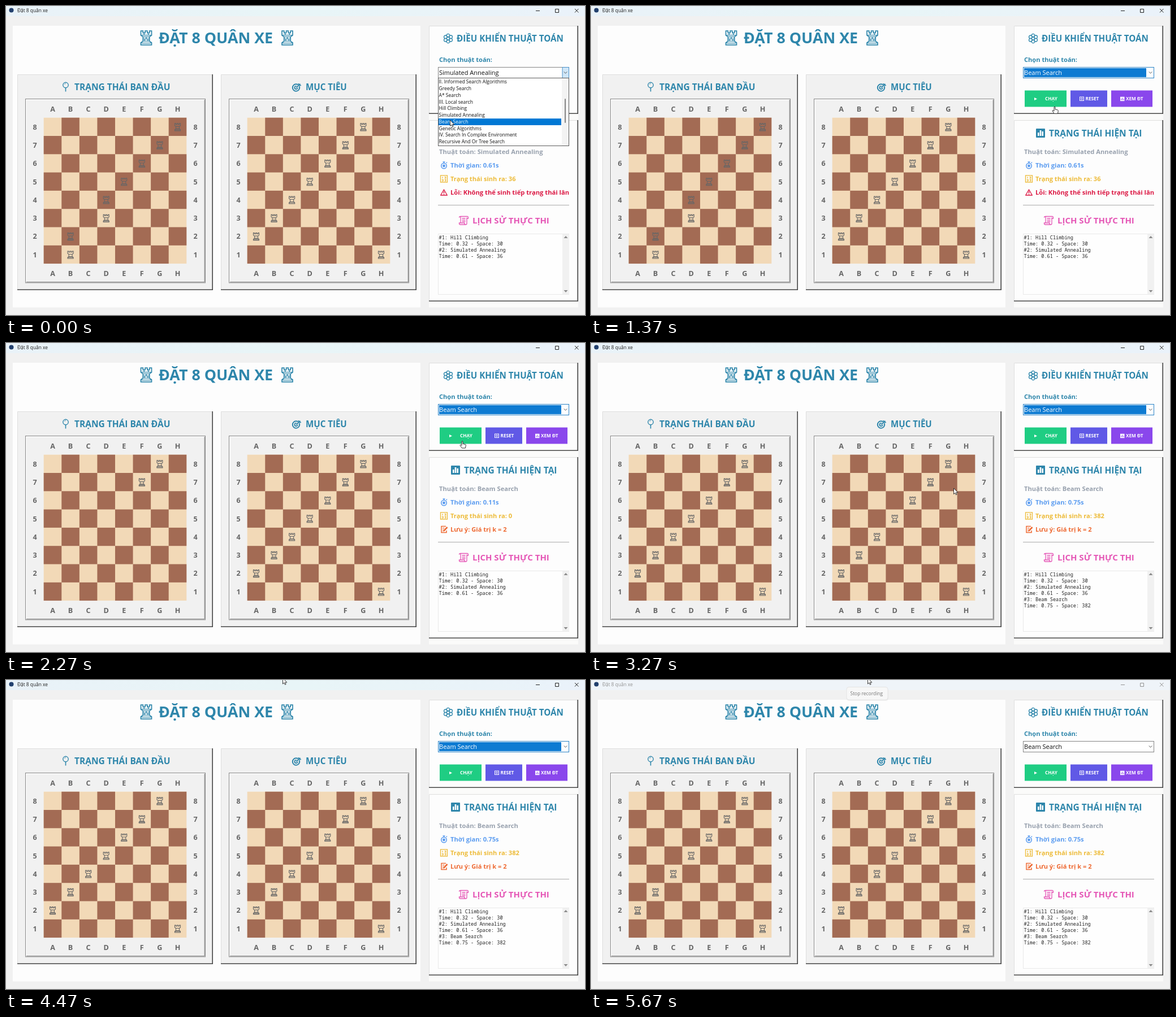
These frames come from a looping animation (1024 px wide and 547 px high, 5710 ms). An HTML page:

```html
<!DOCTYPE html>
<html lang="vi">
<head>
<meta charset="utf-8">
<title>Đặt 8 quân xe</title>
<style>
html, body { margin: 0; width: 100%; height: 100%; overflow: hidden; background: #f1f1f1; }
svg { display: block; width: 100%; height: 100%; }
text { font-family: "Open Sans", "Noto Sans", sans-serif; white-space: pre; }
.b { font-weight: 700; }
.m { font-family: "Noto Sans Mono", "DejaVu Sans Mono", monospace; }
</style>
</head>
<body>
<svg id="stage" viewBox="0 0 1024 547" preserveAspectRatio="none"></svg>
<script>
const LOOP = 5710;
const BLUE = '#2e86ab', PINK = '#e557b6', GRAY = '#98a1ae', SKY = '#5b9cf0',
      GOLD = '#edbb38', RED = '#dc1a45', ORANGE = '#ee6a33', INK = '#666';

const rect = (x, y, w, h, fill, extra = '') =>
  `<rect x="${x}" y="${y}" width="${w}" height="${h}" fill="${fill}" ${extra}/>`;
const line = (d, stroke, w = 1, extra = '') =>
  `<path d="${d}" fill="none" stroke="${stroke}" stroke-width="${w}" ${extra}/>`;
const text = (x, y, size, fill, s, cls = '', extra = '') =>
  `<text x="${x}" y="${y}" font-size="${size}" fill="${fill}" class="${cls}" ${extra}>${s}</text>`;
const bold = (x, y, size, fill, s, extra) => text(x, y, size, fill, s, 'b', extra);
const group = (id, body, extra = '') => `<g id="${id}" ${extra}>${body}</g>`;
const at = (x, y, body, k = 1) => `<g transform="translate(${x} ${y}) scale(${k})">${body}</g>`;

// Raised panel with a dark right and bottom edge
const panel = (x, y, w, h, fill) => rect(x, y, w, h, fill) +
  line(`M${x + .5} ${y + h}V${y + .5}H${x + w}`, '#dedede') +
  line(`M${x} ${y + h - .8}H${x + w - .8}V${y}`, '#454545', 1.6);

const ROOK = 'M-5-6.5h2v1.8h2v-1.8h2v1.8h2v-1.8h2v4l-2 1.5v4l2 1.5v2h-10v-2l2-1.5v-4l-2-1.5z';
const rook = (x, y) => at(x, y, line(ROOK + 'M-3-1h6M-3 3h6M-5 4.7h10', INK, 1.1));
const bigRook = x => at(x, 56.5, line(ROOK, BLUE, .9) +
  line('M-4.5-2.6h9M-3-1h6M-3 1h6M-3 3h6M-4.6 4.8h9.2M0-1v2M-1.5 1v2M1.5 1v2M-2-4.4v1.8M2-4.4v1.8', BLUE, .7), 1.9);

const CW = 31.57, CH = 32.3, LEFT = 66.7, TOP = 197.7;
const piece = (dx, col, row) => rook(LEFT + dx + (col + .5) * CW, TOP + (row + .5) * CH + .5);
const GOAL = [6, 5, 4, 3, 2, 1, 0, 7];
const START = [7, 6, 5, 4, 3, 3, 1, 1];

function board(dx) {
  let s = panel(20 + dx, 121, 346, 382, '#f1f1f1');
  s += rect(34.5 + dx, 164.5, 318, 325.5, 'none', 'stroke="#8c8c8c"');
  s += line(`M${36 + dx} 488.5V166H${351 + dx}`, '#fff') +
       line(`M${36 + dx} 488.7H${351.2 + dx}V166`, '#777');
  s += rect(LEFT + dx, TOP, CW * 8, CH * 8, '#f2d9b7');
  for (let r = 0; r < 8; r++) {
    for (let c = 0; c < 8; c++)
      if ((r + c) % 2) s += rect(LEFT + dx + c * CW, TOP + r * CH, CW, CH, '#a36b54');
    const x = LEFT + dx + (r + .5) * CW, y = TOP + (r + .5) * CH + 4.8, mid = 'text-anchor="middle"';
    for (const ly of [186.5, 477.5]) s += bold(x, ly, 12.6, INK, 'ABCDEFGH'[r], mid);
    for (const lx of [51, 335]) s += bold(lx + dx, y, 12.6, INK, 8 - r, mid);
  }
  return s;
}

const petals = [0, 1, 2, 3, 4, 5].map(i => {
  const a = i * Math.PI / 3;
  return `<circle cx="${(5.4 * Math.sin(a)).toFixed(2)}" cy="${(-5.4 * Math.cos(a)).toFixed(2)}" r="2.8"/>`;
}).join('');
const icon = {
  gear: at(782, 57.5, `<g fill="none" stroke="${BLUE}" stroke-width="1.3">${petals}<circle r="2.6"/></g>`),
  pin: at(105.5, 143, `<circle cy="-3" r="4.7" fill="none" stroke="${BLUE}" stroke-width="1.4"/>` +
    line('M0 1.8V8.5', BLUE, 1.6) + line('M-2-4.2q.6-1.6 2.2-1.6', BLUE, 1)),
  target: at(513, 144.5, `<g fill="none" stroke="${BLUE}"><circle r="6.2" stroke-width="2"/><circle r="2.6" stroke-width="1.8"/></g>` +
    line('M0 0L7-6', '#f1f1f1', 3.6) + line('M0 0L7.5-6.5M4.5-4V-7.5M4.5-4H9', BLUE, 1.7)),
  chart: at(795, 225, rect(-8, -8, 16, 16, BLUE, 'rx="1"') +
    rect(-5, -1, 2.6, 6, '#fff') + rect(-1.3, -5, 2.6, 10, '#fff') + rect(2.4, -3, 2.6, 8, '#fff')),
  watch: at(774.5, 282, `<circle cy="1" r="4.7" fill="none" stroke="${SKY}" stroke-width="1.6"/><circle cy="1" r="2.4" fill="${SKY}"/>` +
    line('M-2-6H2M0-6V-3M4-4l1.5-1.5', SKY, 1.4)),
  digits: at(774.5, 306, rect(-6, -6, 12, 12, 'none', `stroke="${GOLD}" stroke-width="1.3"`) +
    line('M-2.5-3.8v3M1-3.4h2.2v2.4H1M-3.8 1.4h2.4v2.4h-2.4M1.2 1.2h2v2.6h-2', GOLD, 1.2)),
  warn: at(774.5, 330, line('M0-5L5.8 5H-5.8Z', RED, 1.4, 'stroke-linejoin="round"') + line('M0-2V1.8M0 2.7V4', RED, 1.4)),
  note: at(774.5, 330, line('M3.5-5.5H-4.5V5.5H4.5V2', ORANGE, 1.5) +
    line('M-2.5-2.5H1M-2.5 0H0M-2.5 2.7H1', ORANGE, 1.2) + line('M0 2.4L6-4', ORANGE, 2.6)),
  scroll: at(809.5, 379.5, line('M-5.5 4V-7H6.5q1.5 0 1.5 2v1.5H5.5M5.5-5V5.5q0 2-2 2H-6q-2 0-2-2V4.5H1.5v1.2q0 1.8 2 1.8M-8-5q0-2 2.2-2M-3-3.5H3M-3-.7H3M-3 2H3', PINK, 1.3))
};

function button(x, w, fill, label, lx) {
  return rect(x, 149.5, w, 29, fill) + bold(lx, 167.2, 8.2, '#fff', label);
}

const ITEMS = ['II. Informed Search Algorithms', 'Greedy Search', 'A* Search', 'III. Local search',
  'Hill Climbing', 'Simulated Annealing', 'Beam Search', 'Genetic Algorithms',
  'IV. Search In Complex Environment', 'Recursive And Or Tree Search'];
const dropdown = rect(764.5, 127.5, 231, 120, '#fff', 'stroke="#5c5c5c"') +
  rect(983, 128, 12, 119, '#f3f3f3') + rect(988, 164, 2, 43, '#858585', 'rx="1"') +
  ITEMS.map((s, i) => {
    const on = i === 6;
    return (on ? rect(765, 199.2, 217, 11.8, '#0078d4') : '') +
      text(765.5, (137.2 + i * 11.77).toFixed(1), 8.5, on ? '#fff' : '#111', s);
  }).join('');

const HISTORY = ['#1: Hill Climbing', 'Time: 0.32 - Space: 30', '#2: Simulated Annealing',
  'Time: 0.61 - Space: 36', '#3: Beam Search', 'Time: 0.75 - Space: 382'];
const log = (from, to) => HISTORY.slice(from, to)
  .map((s, i) => text(765.5, 412.5 + (from + i) * 11, 8.57, '#222', s, 'm')).join('');

const chevron = line('M986.7 116.4l2.8 2.8 2.8-2.8', '#555');

document.getElementById('stage').innerHTML =
  `<defs><linearGradient id="sky"><stop offset="0" stop-color="#e9f2f8"/><stop offset=".5" stop-color="#e8f5f7"/><stop offset="1" stop-color="#eaf2fa"/></linearGradient>
  <clipPath id="card"><rect x="748" y="203" width="249" height="320"/></clipPath></defs>` +
  rect(0, 0, 1024, 547, '#f1f1f1') +
  rect(0, 0, 1024, 18, 'url(#sky)') +
  rect(0, 0, 1024, 18, '#eff4f9', 'id="dim"') +
  '<circle cx="9.5" cy="7.5" r="4" fill="#22406e"/>' +
  group('bar', text(20, 11.2, 8.4, 'currentColor', 'Đặt 8 quân xe') +
    line('M937 8.5h7M971.5 5.5h6v6h-6zM1006 5l6.5 6.5M1012.5 5l-6.5 6.5', 'currentColor')) +

  rect(12, 35, 721, 498.5, '#fdfdfd') +
  bigRook(248) + bigRook(497.5) +
  bold(270, 65.6, 26.8, BLUE, 'ĐẶT 8 QUÂN XE') +
  board(0) + board(360) +
  icon.pin + bold(121, 149, 15.5, BLUE, 'TRẠNG THÁI BAN ĐẦU') +
  icon.target + bold(530, 149, 15.1, BLUE, 'MỤC TIÊU') +
  GOAL.map((c, r) => piece(360, c, r)).join('') +
  group('old', START.map((c, r) => piece(0, c, r)).join('')) +
  group('fresh', GOAL.map((c, r) => `<g>${piece(0, c, r)}</g>`).join('')) +

  rect(748, 35, 264, 498.5, '#fbfbfa') +
  panel(748, 35, 264, 156, '#fdfdfd') +
  panel(748, 202, 264, 321, '#fdfdfd') +
  icon.gear + bold(797, 63, 15.2, BLUE, 'ĐIỀU KHIỂN THUẬT TOÁN') +
  bold(766, 99, 11.1, BLUE, 'Chọn thuật toán:') +
  rect(764.5, 108.5, 231, 19, '#fff', 'id="combo"') +
  rect(766, 110, 216, 16, '#0e7bd2', 'id="picked"') +
  rect(984, 108.5, 11.5, 19, '#cfe6f8', 'id="arrow" stroke="#4a90c8"') + chevron +
  text(766, 122.3, 11, '#111', '', '', 'id="choice"') +
  button(767, 74, '#1fcd83', 'CHẠY', 803) +
  '<path d="M784 162v5l5-2.5z" fill="#fff"/>' +
  button(848, 65, '#6059e6', 'RESET', 874.5) +
  rect(864.5, 161, 7, 6.5, 'none', 'stroke="#fff"') + '<circle cx="868" cy="164.3" r="1.5" fill="none" stroke="#fff"/>' +
  button(920, 73, '#8a47ec', 'XEM ĐT', 946) +
  rect(936, 160.7, 7.5, 7.5, '#fff') + line('M938 166.5v-2.5M940 166.5v-4M942 166.5v-2', '#8a47ec') +

  icon.chart + bold(810, 230.8, 15.5, BLUE, 'TRẠNG THÁI HIỆN TẠI') +
  bold(766, 261.6, 11.2, GRAY, '', 'id="algo"') +
  icon.watch + bold(786, 285.8, 11.2, SKY, '', 'id="time"') +
  icon.digits + bold(786, 309.8, 11.1, GOLD, '', 'id="count"') +
  group('error', icon.warn + bold(786, 334, 11.2, RED, 'Lỗi: Không thể sinh tiếp trạng thái lân'), 'clip-path="url(#card)"') +
  group('hint', icon.note + bold(786, 334, 11.1, ORANGE, 'Lưu ý: Giá trị k = 2')) +
  line('M764 352.5H996', '#aaa') +
  icon.scroll + bold(825, 385, 15, PINK, 'LỊCH SỬ THỰC THI') +
  rect(764.5, 403.5, 231, 107, '#fefefe', 'stroke="#e9e9e9"') +
  rect(984, 404, 12, 106, '#f1f1f1') +
  '<path d="M986.5 411l3.5-4 3.5 4zM986.5 503l3.5 4 3.5-4z" fill="#8b8b8b"/>' +
  log(0, 4) + group('third', log(4, 6)) +
  group('list', dropdown) +

  group('tip', rect(452.5, 14, 73, 23, '#000', 'rx="4" opacity=".05"') +
    rect(452, 12.5, 73, 22.5, '#f7f7f7', 'rx="4" stroke="#e4e4e4"') +
    text(458.5, 26.8, 8.45, '#777', 'Stop recording')) +
  group('cursor',
    '<path id="pointer" d="M0 0V10.5L2.4 8.3 4 11.8 5.6 11 4.1 7.7H7.3Z" fill="#fff" stroke="#222" stroke-width=".9"/>' +
    '<path id="hand" d="M-1 .8Q0-.4 1 .8V5l4.3 1q1.2.4 1 1.8L5.4 12.5H-.6L-3.8 8Q-4.2 6.5-2.6 6.8L-1 8Z" fill="#fff" stroke="#222" stroke-width=".9"/>');

const el = {};
document.querySelectorAll('svg [id]').forEach(e => el[e.id] = e);
const show = (e, on) => { e.style.display = on ? '' : 'none'; };
const put = (e, s) => { if (e.textContent !== s) e.textContent = s; };

const PICK = 130, RUN = 2140, STEP = 107, DONE = RUN + 7 * STEP, TIP = 5380, BLUR = 5470;
// Cursor stops: time, x, y
const PATH = [[0, 785.5, 202], [200, 785.5, 202], [720, 508.5, 8], [900, 508.5, 8], [1340, 820, 178],
  [1500, 820, 178], [1800, 807, 173.5], [2900, 807, 173.5], [3250, 641.5, 257],
  [3300, 641.5, 257], [3850, 489.5, -3.5], [LOOP, 489.5, -3.5]];

function cursorAt(t) {
  let i = 1;
  while (i < PATH.length - 1 && PATH[i][0] < t) i++;
  const [t0, x0, y0] = PATH[i - 1], [t1, x1, y1] = PATH[i];
  const u = Math.min(1, (t - t0) / (t1 - t0)), k = u * u * (3 - 2 * u);
  return [x0 + (x1 - x0) * k, y0 + (y1 - y0) * k];
}

function draw(t) {
  const open = t < PICK, ran = t >= RUN, done = t >= DONE, blur = t >= BLUR;
  const level = Math.min(7, Math.floor((t - RUN) / STEP));

  show(el.list, open);
  show(el.arrow, open);
  show(el.picked, !open && !blur);
  el.combo.setAttribute('stroke', open || blur ? '#858585' : '#2b83c6');
  el.choice.setAttribute('fill', open || blur ? '#111' : '#fff');
  put(el.choice, open ? 'Simulated Annealing' : 'Beam Search');

  show(el.old, !ran);
  [...el.fresh.children].forEach((g, i) => show(g, ran && i <= level));
  put(el.algo, 'Thuật toán: ' + (ran ? 'Beam Search' : 'Simulated Annealing'));
  put(el.time, `Thời gian: ${(ran ? level * STEP / 1000 : .61).toFixed(2)}s`);
  put(el.count, 'Trạng thái sinh ra: ' + (done ? 382 : ran ? 0 : 36));
  show(el.error, !ran);
  show(el.hint, ran);
  show(el.third, done);

  show(el.dim, blur);
  el.bar.style.color = blur ? '#929292' : '#222';
  el.tip.style.opacity = Math.max(0, Math.min(1, (t - TIP) / 90));

  const [x, y] = cursorAt(t);
  const over = x > 767 && x < 841 && y > 149 && y < 179;
  show(el.hand, over);
  show(el.pointer, !over);
  el.cursor.setAttribute('transform', `translate(${x.toFixed(2)} ${y.toFixed(2)})`);
}

const begin = performance.now();
function tick() {
  draw((performance.now() - begin) % LOOP);
  requestAnimationFrame(tick);
}
tick();
</script>
</body>
</html>
```
